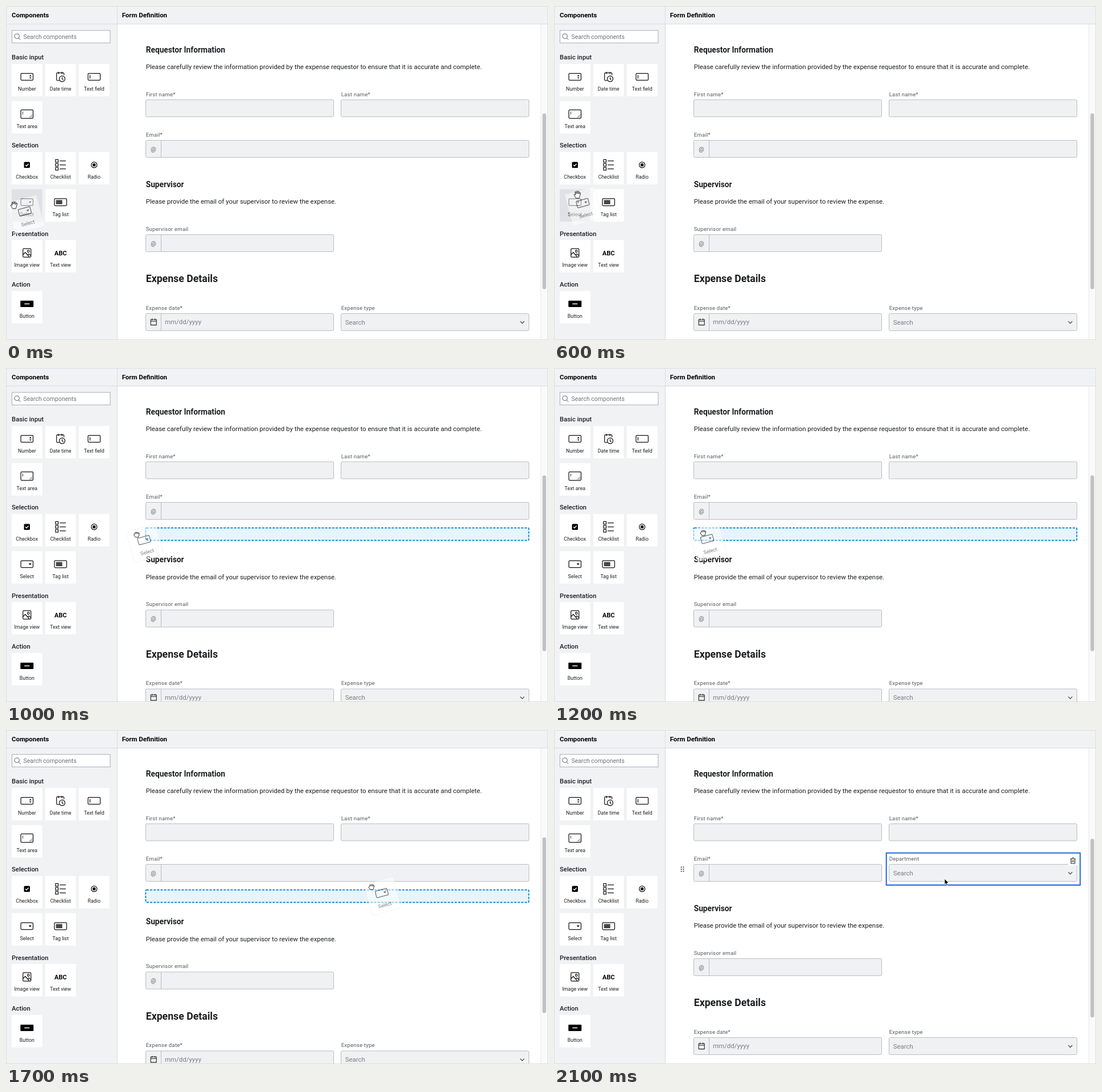
An HTML page for the animation above (2.89 s loop, 952x588 px).

```html
<!DOCTYPE html>
<html lang="en">
<head>
<meta charset="utf-8">
<title>Form builder drag and drop</title>
<style>
  html, body { margin: 0; width: 100%; height: 100%; overflow: hidden; background: #fff; }
  svg { display: block; width: 952px; height: 588px; }
  text { font-family: Roboto, Arial, sans-serif; font-size: 11.44px; fill: #1c1e21; white-space: pre; }
  .bar { font-weight: 700; fill: #000; }
  .section { font-size: 11.3px; font-weight: 500; }
  .tile { font-size: 8.9px; text-anchor: middle; }
  .title { font-size: 13.75px; font-weight: 700; }
  .big { font-size: 17.7px; font-weight: 700; }
  .label { font-size: 9.6px; letter-spacing: .22px; fill: #55585d; }
  .hint { fill: #7b7e84; }
  .at { font-size: 10.5px; fill: #5d6065; text-anchor: middle; }
  .abc { font-size: 11px; font-weight: 700; fill: #000; text-anchor: middle; }
  .field { fill: #f0f1f3; stroke: #b9bbc0; }
  .line { fill: none; stroke: #111; stroke-width: 1.25; }
  .drop { fill: #e5f5fe; stroke: #1789d4; stroke-width: 2; stroke-dasharray: 4.1 2.05; }
  .hand { fill: #fff; stroke: #222; stroke-width: .95; stroke-linejoin: round; stroke-linecap: round; }
</style>
</head>
<body>
<svg id="stage" viewBox="0 0 952 588" xmlns="http://www.w3.org/2000/svg"></svg>
<script>
const LOOP = 2890;
const SHIFT = 23.5;
const GREY = '#f1f2f4';

const text = (x, y, s, cls = '') => `<text x="${x}" y="${y}" class="${cls}">${s}</text>`;
const rect = (x, y, w, h, attrs = '') => `<rect x="${x}" y="${y}" width="${w}" height="${h}" ${attrs}/>`;
const path = (d, attrs = 'class="line"') => `<path d="${d}" ${attrs}/>`;
const group = (content, attrs) => `<g ${attrs}>${content}</g>`;
const at = (x, y, content) => group(content, `transform="translate(${x} ${y})"`);

// Icons are drawn around their own centre.
const frame = rect(-10.7, -6, 21.4, 12, 'rx="1.5" class="line"');
const icons = {
  'Number': frame + path('M4 -1L6 -3.4L8 -1ZM4 1L6 3.4L8 1Z', ''),
  'Date time': path('M-2 6.5H-5.5Q-7 6.5 -7 5V-5.5Q-7 -7 -5.5 -7H4.5Q6 -7 6 -5.5V-3M-3.5 -9V-5M2.5 -9V-5')
    + '<circle cx="2.8" cy="3.5" r="5" class="line"/>' + path('M2.8 .5V3.7L4.8 5.3'),
  'Text field': frame + path('M-7.3 -3V3'),
  'Text area': rect(-10.7, -7.5, 21.4, 15, 'rx="1.5" class="line"')
    + path('M-7.3 -4.5V.5M4.5 6L9 1.5M7.3 6L9 4.3', 'fill="none" stroke="#222" stroke-width=".9"'),
  'Checkbox': rect(-5.2, -5.2, 10.4, 10.4, 'rx="1.5"') + path('M-2.7 0L-.8 2L2.8 -2', 'fill="none" stroke="#fff" stroke-width="1.3"'),
  'Checklist': [-7, 0, 7].map(y => rect(-8.8, y - 2.3, 4.6, 4.6, 'class="line"') + path(`M-1.5 ${y}H9.3`)).join(''),
  'Radio': '<circle r="5" class="line"/><circle r="2.7"/>',
  'Select': frame + path('M3 -1.4H8L5.5 1.8Z', ''),
  'Tag list': rect(-10.7, -6.3, 21.4, 12.6, 'rx="1.5" class="line"') + rect(-8, -3.7, 11, 7.4, 'fill="#45474c"'),
  'Image view': rect(-7, -7.5, 14, 15, 'rx="1.5" class="line"') + '<circle cx="2.5" cy="-3" r="1.8" class="line"/>'
    + path('M-7 3L-3 -1L4 6.5M1.5 3.5L3.5 1.7L7 5'),
  'Text view': text(0, 4, 'ABC', 'abc'),
  'Button': rect(-11.5, -5.7, 23, 11.4, 'rx="1"') + path('M-4.5 0H4.5', 'stroke="#fff" stroke-width="1.5"'),
};

const sections = [
  ['Basic input', 94, 102, ['Number', 'Date time', 'Text field', 'Text area']],
  ['Selection', 249.3, 257, ['Checkbox', 'Checklist', 'Radio', 'Select', 'Tag list']],
  ['Presentation', 404.5, 412, ['Image view', 'Text view']],
  ['Action', 494, 501.7, ['Button']],
];

const tileBody = name => at(26.8, 22.7, icons[name]) + text(26.8, 47.4, name, 'tile');

function sidebar() {
  let out = rect(0, 0, 195.5, 588, `fill="${GREY}"`)
    + rect(10.5, 43, 172.5, 22, 'fill="#fff" stroke="#a9abb0"')
    + '<circle cx="19.2" cy="53.2" r="4.1" fill="none" stroke="#55585d"/>'
    + path('M22.2 56.3L25.5 59.6', 'stroke="#55585d"')
    + '<text x="30.5" y="58" style="font-size:10.5px;fill:#6f7278">Search components</text>';
  for (const [title, baseline, top, names] of sections) {
    out += text(10, baseline, title, 'section');
    names.forEach((name, i) => {
      const x = 10 + i % 3 * 59, y = top + Math.floor(i / 3) * 65.6;
      out += at(x, y, rect(0, 0, 53.7, 57, `fill="#fff" data-tile="${name}"`) + tileBody(name));
    });
  }
  return out;
}

const field = (x, y, w, attrs = '') => rect(x, y, w, 30, `rx="2" class="field" ${attrs}`);
const divider = y => path(`M272.5 ${y}v30`, 'stroke="#b9bbc0"');
const mailPrefix = y => divider(y) + text(259, y + 19, '@', 'at');
const searchBox = y => field(588.5, y, 330) + text(595.7, y + 19, 'Search', 'hint')
  + path(`M903.3 ${y + 13.6}l3.5 3.5l3.5 -3.5`, 'fill="none" stroke="#333" stroke-width="1.1"');

const upperForm = text(245.7, 81.8, 'Requestor Information', 'title')
  + text(245.7, 111, 'Please carefully review the information provided by the expense requestor to ensure that it is accurate and complete.')
  + text(245.7, 158.6, 'First name*', 'label') + field(245.5, 165, 330)
  + text(588.7, 158.6, 'Last name*', 'label') + field(588.5, 165, 330)
  + text(245.7, 230, 'Email*', 'label') + field(245.5, 236.5, 673, 'id="email"') + mailPrefix(236.5);

const lowerForm = text(245.7, 318.7, 'Supervisor', 'title')
  + text(245.7, 348.2, 'Please provide the email of your supervisor to review the expense.')
  + text(245.7, 395.8, 'Supervisor email', 'label') + field(245.5, 402.5, 330) + mailPrefix(402.5)
  + text(245.7, 486.3, 'Expense Details', 'big')
  + text(245.7, 534.8, 'Expense date*', 'label') + field(245.5, 541.5, 330) + divider(541.5)
  + at(259.2, 556.3, path('M-5 -4.3H5V5.3H-5ZM-5 -1.3H5M-2.5 -6V-3M2.5 -6V-3', 'fill="none" stroke="#222" stroke-width="1.1"'))
  + text(279, 560.3, 'mm/dd/yyyy', 'hint')
  + text(588.7, 534.8, 'Expense type', 'label') + searchBox(541.5);

const rowDrop = rect(245.3, 281.5, 673, 22, 'rx="1.5" class="drop"');
const cellDrop = rect(584.8, 215.8, 340, 57, 'rx="1.5" class="drop"') + rect(588, 238, 333, 29, 'fill="#edf2f6"');
const dots = [223.6, 227.4].map(x => [241.4, 245, 248.6].map(y => rect(x - .8, y - .8, 1.7, 1.7, 'fill="#222"')).join('')).join('');

const trash = path('M-4.5 -3.3H4.5M-1.7 -5.3H1.7M-3.4 -3.3V5H3.4V-3.3M-1.1 -.8V2.6M1.1 -.8V2.6',
  'fill="none" stroke="#222" stroke-width="1.1"');
const newField = rect(583.7, 216.5, 340.5, 56.5, 'fill="#fff" stroke="#1e66dc" stroke-width="2"')
  + text(588.7, 230, 'Department', 'label') + searchBox(236.5)
  + rect(903, 221.5, 17, 17, 'fill="#fff"') + at(911.5, 230, trash);

const openHand = path('M-2.6 6.4L-5.6 1.6Q-6.2 -.3 -4.6 -.1L-3 1.4L-4.1 -3.4Q-3.9 -5.2 -2.5 -4.2L-1.6 -1L-1.6 -5.2Q-.5 -6.8 .5 -5.2L.6 -1L1.6 -4.9Q2.9 -6 3.4 -4.3L2.9 -.5L4.2 -2.9Q5.8 -3.3 5.6 -1.7L4.3 3L3.3 6.4Z', 'class="hand"');
const fist = path('M-2.4 4.6L-4.7 1.5Q-5.2 -.6 -3.3 -.4L-3.5 -2.3Q-3 -4 -1.5 -3.2Q-.5 -4.6 .8 -3.4Q2.2 -4.2 3.1 -2.8Q4.8 -3 4.6 -.8L3.5 2.8L3 4.6Z', 'class="hand"')
  + path('M-1.3 -2.8V-1.2M.9 -2.8V-1.2M2.9 -2.4V-1', 'class="hand"');
const arrow = path('M0 0V10.2L2.4 8L4 11.8L5.8 11L4.2 7.3H7.4Z', 'fill="#000" stroke="#fff" stroke-width=".8"');

const dragged = group(at(-26.8, -22.7, rect(0, 0, 53.7, 57, 'rx="2" fill="#fff" stroke="#e6e8ec" stroke-width=".7"')
  + tileBody('Select')), 'opacity=".55" transform="rotate(-15)"');

const layer = (id, content = '') => group(content, `id="${id}"`);
const stage = document.getElementById('stage');
stage.innerHTML = rect(0, 0, 952, 588, 'fill="#fff"')
  + upperForm + layer('lower', lowerForm)
  + layer('rowDrop', rowDrop) + layer('cellDrop', cellDrop) + layer('newField', newField) + layer('dots', dots)
  + rect(939.5, 32, 12, 556, 'fill="#fafafa"') + path('M939.5 32V588', 'stroke="#e7e7e8"')
  + rect(942.3, 189, 6.4, 309.5, 'id="thumb" rx="3.2" fill="#c1c1c3"')
  + sidebar()
  + rect(0, 0, 952, 32, `fill="${GREY}"`)
  + path('M0 31.8H952M195.5 0V588', 'stroke="#d9dbdf"')
  + text(10, 19.7, 'Components', 'bar') + text(203.7, 19.7, 'Form Definition', 'bar')
  + rect(.5, .5, 951, 587, 'fill="none" stroke="#dcdee1"')
  + layer('dragged', dragged) + layer('openHand', openHand) + layer('fist', fist) + layer('arrow', arrow);

const el = id => document.getElementById(id);
const show = (id, on) => el(id).style.display = on ? '' : 'none';
const move = (id, x, y) => el(id).setAttribute('transform', `translate(${x} ${y})`);

// Start time, pointer position, position of the icon on the dragged card.
// The card trails the pointer; the drag overshoots to the right and swings back up.
const steps = [
  [0, 14, 350, 33, 361.5], [200, 14, 349.5, 33, 361], [300, 14.5, 349, 33.5, 360.5],
  [500, 24, 342, 38, 356], [600, 41, 331.5, 50.5, 347], [700, 88, 316, 86, 332],
  [800, 154, 304, 148, 320], [900, 203, 298, 200, 312], [1000, 229.5, 293, 242.5, 303],
  [1100, 237, 291.5, 251, 302], [1200, 262, 290, 269, 301], [1300, 318, 288.5, 311, 299.5],
  [1400, 404, 287.5, 382.5, 298], [1500, 605, 287.5, 575, 298], [1600, 765, 288, 768, 298],
  [1700, 642, 276, 660, 287], [1800, 683, 266, 698.5, 276], [1900, 685, 265, 700, 275],
];

function hoveredTile(t) {
  if (t < 700) return 'Select';
  if (t < 800) return 'Checklist';
  return t < 1000 ? 'Radio' : '';
}

function render(t) {
  const [, px, py, ix, iy] = steps.findLast(step => step[0] <= t);
  const inRow = t >= 1000 && t < 1800;
  const beside = t >= 1800;
  const dropped = t >= 2000;

  move('lower', 0, inRow ? SHIFT : 0);
  show('rowDrop', inRow);
  show('cellDrop', beside && !dropped);
  show('newField', dropped);
  show('dots', beside);
  el('email').setAttribute('width', dropped ? 330 : beside ? 331.5 : 673);
  el('thumb').setAttribute('y', beside ? 191.5 : 189);
  el('thumb').setAttribute('height', beside ? 314.5 : 309.5);

  const hovered = hoveredTile(t);
  document.querySelectorAll('[data-tile]').forEach(tile =>
    tile.setAttribute('fill', tile.dataset.tile === hovered ? '#e0e1e5' : '#fff'));

  move('dragged', ix, iy);
  move('openHand', px, py);
  move('fist', px, py);
  move('arrow', 686, 262);
  show('dragged', !dropped);
  show('openHand', t < 700);
  show('fist', t >= 700 && !dropped);
  show('arrow', dropped);
}

const start = performance.now();
function tick() {
  render((performance.now() - start) % LOOP);
  requestAnimationFrame(tick);
}
tick();
</script>
</body>
</html>
```
